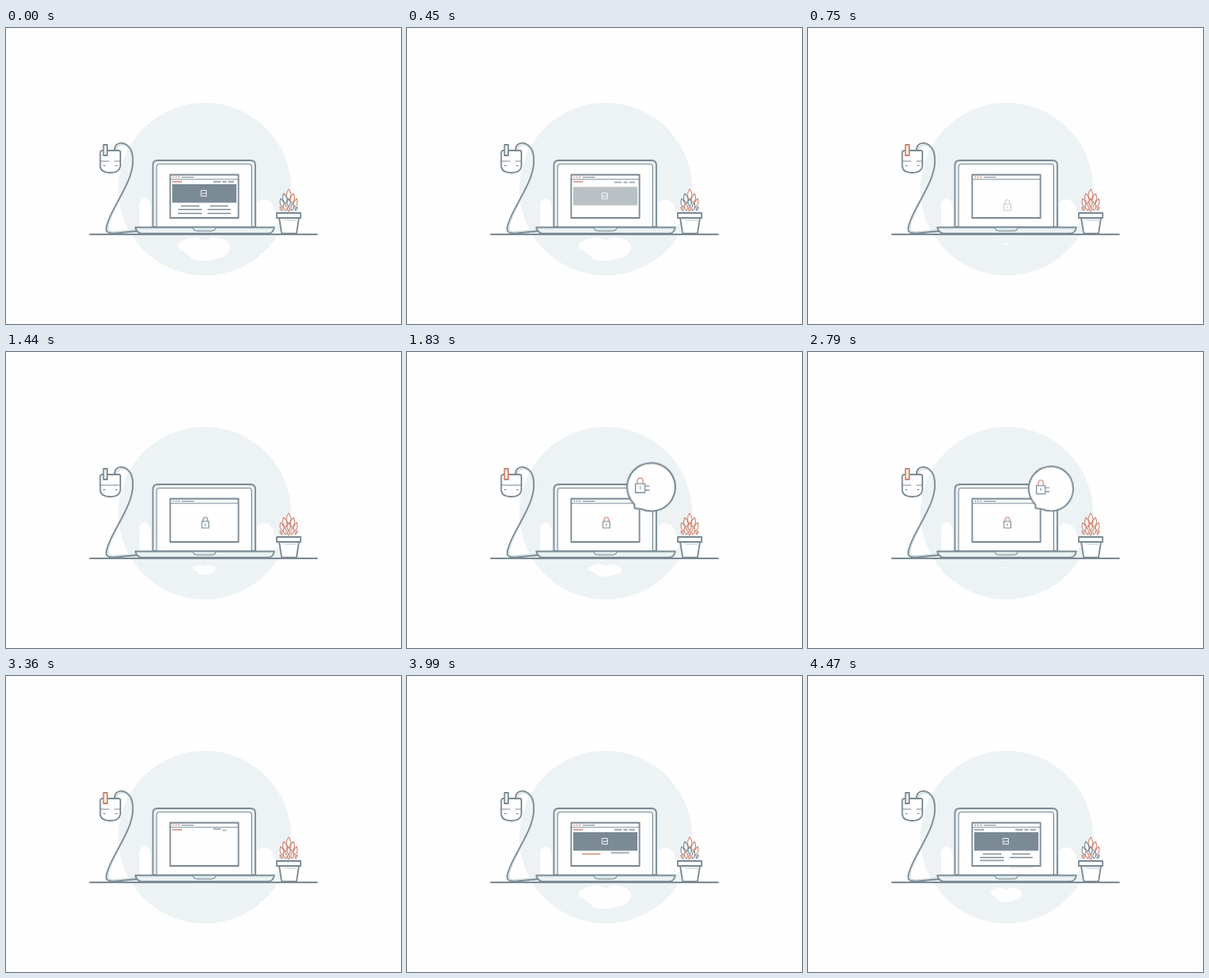
These frames come from a looping animation (480x360 px, 4500 ms). An HTML page:

```html
<!DOCTYPE html>
<html lang="en">
<head>
<meta charset="utf-8">
<title>Unlocking a page</title>
<style>
  html, body { margin: 0; width: 100%; height: 100%; overflow: hidden; background: #fefefe; }
  svg { display: block; width: 100vw; height: 100vh; }
  .line { fill: none; stroke: #7b8b95; stroke-width: 1.8; stroke-linecap: round; stroke-linejoin: round; }
  .thin { stroke-width: 1.1; }
  .white { fill: #fefefe; }
  .pale { fill: #edf2f5; }
  .coral { stroke: #cd8672; }
  .bar { fill: none; stroke: #7b8b95; stroke-width: 1.4; }
  #bubble { transform-origin: 277px 190px; }
  #glow { transform-origin: 241px 262px; }
</style>
</head>
<body>
<svg viewBox="0 0 480 360">
  <circle class="pale" cx="241.5" cy="196" r="105"/>
  <g class="white">
    <path d="M162 242V217Q162 207 169 207Q175 208 176 219V242Z"/>
    <path d="M305 242V214Q310 205 319 210Q326 214 326 222L331 225V236L326 242Z"/>
    <path id="glow" d="M209 263Q216 256 231 254L242 259L251 254Q272 256 272 268Q270 278 258 280Q240 286 226 281Q220 273 209 268Z"/>
  </g>

  <path class="line" d="M102 251H378" stroke-width="1.6"/>

  <g id="charger">
    <path class="line" style="stroke:#d9e1e5" d="M134 151C133 140 147 138 152 151C160 178 139 203 128 229C122 243 122 249 132 248L159 246"/>
    <path class="line" d="M132 149C131 137 148 136 153 151C160 176 138 204 127 228C119 246 119 251 134 249.500L160 247"/>
    <path class="line white" d="M117 149H137Q139 149 139 151V168Q138 176 127 176Q115 176 114.500 168V151Q115 149 117 149Z"/>
    <path class="line thin" d="M115 162H125M132 162H139M118.500 167.500H120.500M133 167.500H135"/>
    <path id="brow" class="line thin" d="M125 162H132"/>
    <rect id="prong" class="line white" x="118.500" y="142" width="4.500" height="13" stroke-width="1.5"/>
  </g>

  <path class="line pale" d="M178.500 242V167Q178.500 161 184.500 161H297Q303 161 303 167V242Z"/>
  <path class="line thin white" d="M183 242V169Q183 165.500 186.500 165.500H295Q298.500 165.500 298.500 169V242Z"/>
  <path class="line" style="fill:#eaf2f3" d="M157 242.500H326Q325 250 317 250H166Q159 250 157 242.500Z"/>
  <path class="line thin" style="fill:#d9e4e7" d="M227 242.500Q228 247 232 247H250Q254 247 255 242.500Z"/>

  <rect class="line white" x="199.500" y="178.500" width="83" height="52.500" stroke-width="1.5"/>
  <path class="line thin" d="M199.500 184H282.500M214 181.500H228"/>
  <g id="dots" fill="#7b8b95">
    <circle cx="203.500" cy="181.300" r=".9"/><circle cx="206.700" cy="181.300" r=".9"/><circle cx="210" cy="181.300" r=".9"/>
  </g>

  <g id="page">
    <g id="hero">
      <rect x="202" y="190" width="78" height="22.500" fill="#7b8b95"/>
      <path d="M237 197.500H243.500V204.500H237ZM237.500 203L239.500 200.500L241 202L243 200" fill="none" stroke="#f5f8f9" stroke-width=".9"/>
    </g>
  </g>

  <g id="lock">
    <path class="line thin white" d="M238 206H246.500V214H238Z"/>
    <path id="shackle" class="line thin" d="M239.500 206V204Q239.500 201 242.200 201Q245 201 245 204V206"/>
    <path class="line thin" d="M242.200 209V211"/>
  </g>

  <g id="bubble">
    <path class="line white" d="M276.500 186A25.500 25.500 0 1 1 284 191L276.500 190Z"/>
    <path class="line thin" d="M277.500 164H287.500V173.500H277.500ZM282.500 167.500V169.500M288 166.500H292M288 171H292"/>
    <path class="line thin coral" d="M279.500 164V161.500Q279.500 158 282.500 158Q285.500 158 285.500 161.500V164"/>
  </g>

  <g id="plant"></g>
  <path class="line white" d="M332 231L335 250H353L356 231Z" stroke-width="1.6"/>
  <path d="M333 232.500H355L354.500 235H341Z" fill="#dfe7ea"/>
  <rect class="line white" x="329" y="225" width="29" height="6" stroke-width="1.6"/>
</svg>
<script>
  const LOOP = 4500, GREY = '#7b8b95', CORAL = '#cd8672';
  const $ = id => document.getElementById(id);

  function add(parent, attrs) {
    const el = document.createElementNS('http://www.w3.org/2000/svg', 'path');
    for (const key in attrs) el.setAttribute(key, attrs[key]);
    return parent.appendChild(el);
  }

  // steps: [ms, properties, easing to the next step]
  function loop(el, steps) {
    const frames = steps.map(([ms, props, easing = 'linear']) => ({ offset: ms / LOOP, easing, ...props }));
    const anim = el.animate(frames, { duration: LOOP, iterations: Infinity });
    anim.startTime = 0;
    return anim;
  }

  const anims = [];
  const run = (el, steps) => anims.push(loop(el, steps));
  const pose = (dy, opacity) => ({ transform: `translate(0px, ${dy}px)`, opacity });

  // Leaves the page, then rises back with a small overshoot.
  function rise(el, out, start, peak, end) {
    run(el, [
      [0, pose(0, 1)], [out, pose(0, 1), 'ease-in'], [out + 160, pose(7, 0)],
      [start, pose(9, 0), 'ease-out'], [peak, pose(-1.5, 1), 'ease-in-out'],
      [end, pose(0, 1)], [LOOP, pose(0, 1)]
    ]);
  }

  // Holds each colour until the next change.
  function tint(el, prop, changes) {
    const steps = changes.map(([ms, color]) => [ms, { [prop]: color }, 'step-end']);
    run(el, [...steps, [LOOP, { [prop]: changes[changes.length - 1][1] }]]);
  }

  // path, out, start, peak, end, coral
  const bars = [
    ['M202 187H214', 440, 3110, 3250, 3340, 1],
    ['M252 187H261', 410, 3200, 3400, 3480],
    ['M263 187H268', 410, 3240, 3440, 3520],
    ['M270 187H277', 410, 3360, 3500, 3580],
    ['M212.500 216.500H235', 290, 3720, 3890, 3980, 1],
    ['M248 216.500H270', 270, 3810, 3980, 4090],
    ['M209 220.700H238', 240, 4030, 4200, 4300],
    ['M245 220.700H273', 220, 4120, 4300, 4400],
    ['M209 225.500H238', 190, 4280, 4460, 4495]
  ];
  for (const [d, out, start, peak, end, coral] of bars) {
    const el = add($('page'), { d, class: 'bar' });
    rise(el, out, start, peak, end);
    if (coral) tint(el, 'stroke', [[0, d.includes('187') ? CORAL : GREY], [600, CORAL], [4250, GREY]]);
  }
  const last = add($('page'), { d: 'M245 225.500H273', class: 'bar' });
  run(last, [[0, pose(0, 1)], [170, pose(0, 1), 'ease-in'], [330, pose(7, 0)],
    [4430, pose(9, 0)], [4470, pose(7.5, .25)], [LOOP, pose(0, 1)]]);

  rise($('hero'), 350, 3430, 3620, 3720);

  run($('lock'), [
    [0, pose(12, 0)], [660, pose(12, 0)], [750, pose(8, .4), 'ease-out'],
    [930, pose(-1.5, 1), 'ease-in-out'], [1040, pose(0, 1)],
    [3010, pose(0, 1), 'ease-in'], [3180, pose(8, 0)], [LOOP, pose(8, 0)]
  ]);
  tint($('shackle'), 'stroke', [[0, GREY], [1650, CORAL]]);

  const size = s => ({ transform: `scale(${s})` });
  run($('bubble'), [
    [0, size(0)], [1680, size(0), 'ease-out'], [1860, size(1.2), 'ease-in-out'],
    [1980, size(.96), 'ease-in-out'], [2080, size(1)], [2740, size(1), 'ease-in-out'],
    [2860, size(1.17), 'ease-in'], [3010, size(0)], [LOOP, size(0)]
  ]);

  const spread = (x, y = x) => ({ transform: `scale(${x}, ${y})` });
  run($('glow'), [
    [0, spread(1)], [480, spread(1)], [740, spread(.1)], [1100, spread(.16)],
    [1440, spread(.42)], [2130, spread(.8, .58)], [2700, spread(.8, .58)],
    [2800, spread(0)], [3400, spread(0)], [3780, spread(1)], [4320, spread(1)],
    [4360, spread(.6)], [4490, spread(.6)], [LOOP, spread(1)]
  ]);

  tint($('prong'), 'stroke', [[0, GREY], [570, CORAL], [1110, GREY], [1650, CORAL], [3750, GREY]]);
  tint($('dots'), 'fill', [[0, CORAL], [1110, GREY], [3240, CORAL], [4350, GREY]]);
  run($('brow'), [[0, { opacity: 0 }, 'step-end'], [1110, { opacity: 1 }, 'step-end'],
    [2700, { opacity: 0 }], [LOOP, { opacity: 0 }]]);

  // foot x, foot y, height, tilt
  const leaves = [
    [343.5, 209, 13, 0], [340, 213, 12, -12], [347, 213, 12, 12],
    [337, 218, 11, -18], [350, 218, 11, 18], [343.5, 217, 9, 0],
    [340, 222, 9, -14], [347, 222, 9, 14], [335.5, 222, 5, -30], [351.5, 222, 5, 30],
    [343.5, 223, 6, 0]
  ];
  leaves.forEach(([x, y, h, tilt], i) => {
    const leaf = add($('plant'), {
      d: `M${x} ${y}q${-h * .42} ${-h * .4} 0 ${-h}q${h * .42} ${h * .6} 0 ${h}Z`,
      transform: `rotate(${tilt} ${x} ${y})`,
      class: 'line thin coral white'
    });
    if (i % 2) tint(leaf, 'stroke', [[0, GREY], [570, CORAL], [3750, GREY]]);
  });
</script>
</body>
</html>
```
